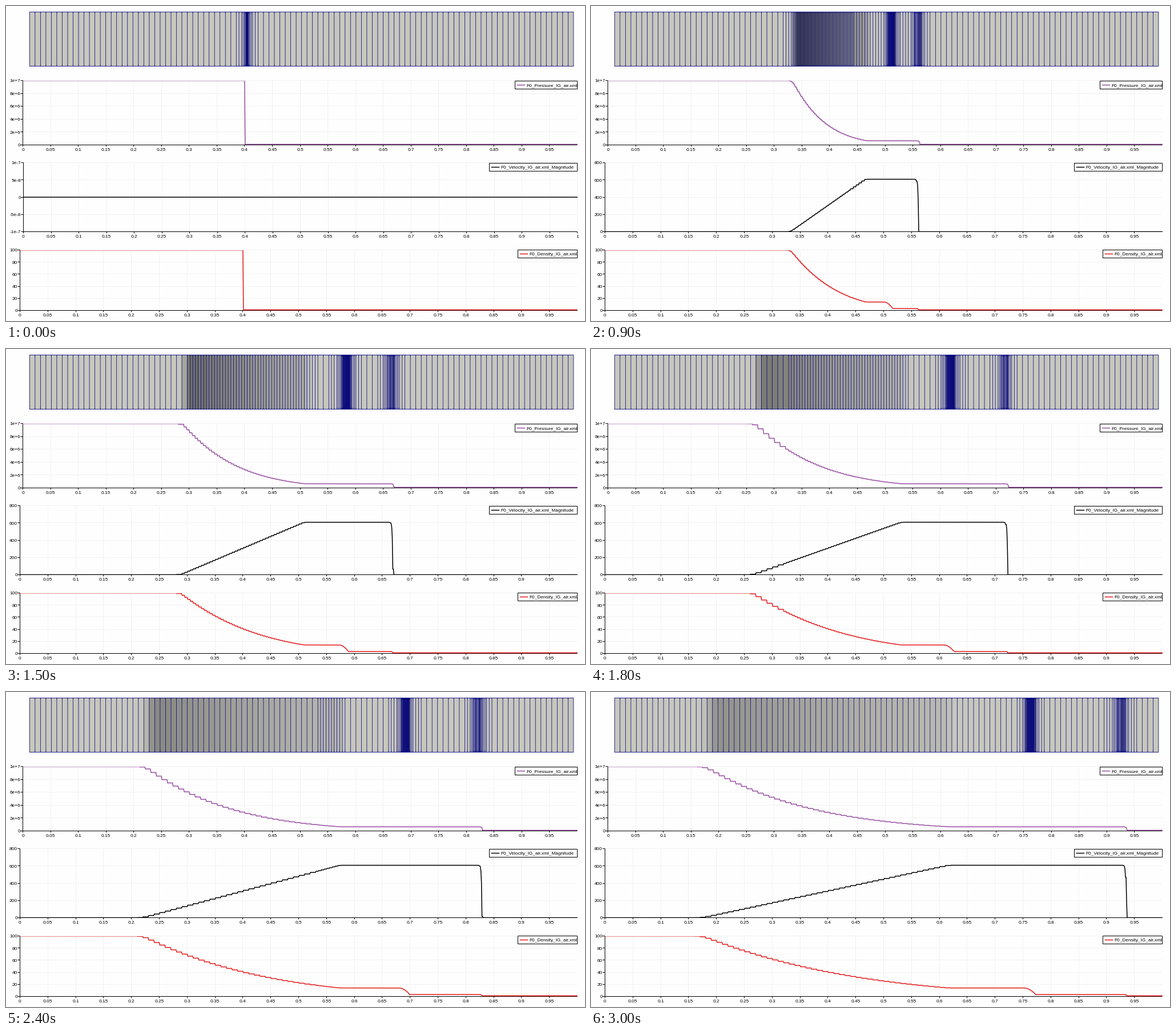
A matplotlib script for the animation above (3300 ms loop, 1014x552 px).

```python
import numpy as np
import matplotlib.pyplot as plt
from matplotlib.animation import FuncAnimation
from matplotlib.collections import LineCollection, PolyCollection
from matplotlib.patches import Rectangle
from matplotlib.transforms import Bbox, TransformedBbox

W, H, DPI = 1014, 552, 64
PX = 72 / DPI                      # points per pixel
FRAMES, STEP_MS = 11, 300
PAPER, GRID, NAVY = "#fdfefd", "#f1f2f1", "#000080"
FACE = np.array([0.78, 0.78, 0.742])
RIGHT = 1000.5

plt.rcParams["font.family"] = "Liberation Sans"
fig = plt.figure(figsize=(W / DPI, H / DPI), dpi=DPI, facecolor=PAPER)
ax = fig.add_axes([0, 0, 1, 1])
ax.set_xlim(0, W)
ax.set_ylim(H, 0)
ax.axis("off")

# ---- shock tube solution ------------------------------------------------
X0 = 0.4
P_L, P_R = 1e7, 1e5
RHO_MID_L, RHO_MID_R = 14.0, 3.17
U_MID = 608.0
SOUND = 374.17
DT = 6e-5                          # simulated seconds per step


def contact_at(k):
    return X0 + U_MID * DT * k


def front_at(k):
    return X0 + 0.003 + 0.0533 * k


def softplus(y, w):
    return w * np.logaddexp(0, y / w)


def state(x, k):
    """Pressure, velocity and density at positions x after k steps."""
    x = np.asarray(x, float)
    if k == 0:
        left = x < X0
        return (np.where(left, P_L, P_R), np.zeros_like(x),
                np.where(left, 100.0, 1.0))
    t = k * DT
    head = X0 - SOUND * t
    tail = X0 + 0.003 + (U_MID - 0.675 * SOUND) * t

    w = 0.001 + 0.0004 * k
    fan = (softplus(x - head, w) - softplus(x - tail, w / 2)) / (tail - head)
    u = U_MID * np.clip(fan, 0, 1)
    c = 1 - 0.2 * u / SOUND
    p, rho = P_L * c ** 7, 100 * c ** 5

    a = contact_at(k) - 0.007 - 0.0006 * k
    b = contact_at(k) + 0.006 + 0.0002 * k
    q = np.clip((x - a) / (b - a), 0, 1) ** 1.9
    rho = rho - (RHO_MID_L - RHO_MID_R) * q

    f = 1 - np.exp(np.minimum((x - front_at(k)) / 0.0011, 0))
    p = P_R + (p - P_R) * f
    rho = 1 + (rho - 1) * f
    return p, u * f, rho


# ---- adaptive mesh ------------------------------------------------------
# Refined parts of the expansion fan per step: (from, to, level)
FAN = {
    1: [(0.378, 0.42, 3)],
    2: [(0.357, 0.385, 3), (0.39, 0.425, 2)],
    3: [(0.335, 0.43, 2), (0.43, 0.46, 1)],
    4: [(0.315, 0.316, 2), (0.32, 0.475, 1), (0.482, 0.484, 2)],
    5: [(0.31, 0.505, 1)],
    6: [(0.34, 0.52, 1)],
    7: [(0.44, 0.54, 1)],
    8: [(0.55, 0.56, 1)],
}


def zones(k):
    if k == 0:
        return [(X0, X0, 4)]
    contact, front = contact_at(k), front_at(k)
    return FAN.get(k, []) + [(contact - 0.004, contact + 0.003, 4),
                             (front - 0.007, front - 0.003, 3)]


def split(lo, h, level, marks, out):
    for a, b, top in marks:
        gap = max(a - lo - h, lo - b, 0)
        if level < top and gap < 1.99 * h:
            split(lo, h / 2, level + 1, marks, out)
            split(lo + h / 2, h / 2, level + 1, marks, out)
            return
    out.append(lo)


def mesh(k):
    marks, out = zones(k), []
    for i in range(100):
        split(i / 100, 0.01, 0, marks, out)
    return np.array(out + [1.0])


MX0, MX1, MY0, MY1 = 41.3, 993.9, 10.5, 105.5
faces = PolyCollection([], edgecolors="none", antialiaseds=False, zorder=1)
edges = LineCollection([], colors=NAVY, linewidths=0.75 * PX, zorder=2)
tips = LineCollection([], colors=NAVY, linewidths=1.4 * PX, alpha=0.3,
                      zorder=2)
for part in (faces, edges, tips):
    part.set_snap(False)
    ax.add_collection(part, autolim=False)
ax.add_patch(Rectangle((MX0, MY0), MX1 - MX0, MY1 - MY0, fill=False,
                       ec=NAVY, lw=0.8 * PX, zorder=3, snap=False))


def draw_mesh(cells, mid, k):
    xs = MX0 + (MX1 - MX0) * cells
    faces.set_verts([[(l, MY0), (r, MY0), (r, MY1), (l, MY1)]
                     for l, r in zip(xs[:-1], xs[1:])])
    e = 0.001
    slope = np.abs(state(mid + e, k)[2] - state(mid - e, k)[2]) / (2 * e)
    shade = np.exp(-8.8e-4 * slope)
    faces.set_facecolor(shade[:, None] * FACE)
    inner = xs[1:-1]
    edges.set_segments([[(x, MY0), (x, MY1)] for x in inner])
    tips.set_segments([[(x, y), (x, y + 3)] for x in inner
                       for y in (MY0, MY1 - 3)])


# ---- charts -------------------------------------------------------------
def label(x, y, text, ha):
    return ax.text(x, y, text, ha=ha, va="baseline", fontsize=8.25 * PX,
                   color="black", zorder=8)


def strokes(segments, color, z):
    """One-pixel lines laid on pixel centres."""
    crisp = np.floor(np.array(segments)) + 0.5
    part = LineCollection(crisp, colors=color, linewidths=PX, zorder=z)
    part.set_snap(False)
    ax.add_collection(part, autolim=False)
    return part


def axes_set(left, top, bottom, names, last=False):
    """Grid, axis lines, ticks and labels; returns all the artists."""
    xt = np.arange(21 if last else 20) / 20
    xp = left + (RIGHT - left) * xt
    yp = np.linspace(top, bottom, len(names))
    grid = [[(x, top), (x, bottom)] for x in xp]
    grid += [[(left, y), (RIGHT, y)] for y in yp]
    dark = [[(left, top), (left, bottom)], [(left, bottom), (RIGHT, bottom)]]
    dark += [[(x, bottom), (x, bottom + 3)] for x in xp]
    dark += [[(left - 4, y), (left, y)] for y in yp]
    parts = [strokes(grid, GRID, 1), strokes(dark, "black", 4)]
    parts += [label(x, bottom + 10.6, f"{t:g}", "center")
              for x, t in zip(xp, xt)]
    parts += [label(left - 4.5, y + 2.8, n, "right")
              for y, n in zip(yp, names)]
    return parts


def legend(x, y, text, color):
    ax.add_patch(Rectangle((x, y), RIGHT - x, 14, fc="white", ec="black",
                           lw=PX, zorder=6, snap=False))
    ax.plot([x + 4, x + 17], [y + 7] * 2, color=color, lw=1.5 * PX,
            zorder=7, snap=False)
    label(x + 19.7, y + 9.7, text, "left")


def curve(left, top, bottom, color):
    line, = ax.plot([], [], color=color, lw=1.5 * PX, zorder=5,
                    solid_joinstyle="round", snap=False)
    box = Bbox([[left - 0.5, bottom + 0.5], [RIGHT + 0.5, top + 0.5]])
    line.set_clip_box(TransformedBbox(box, ax.transData))
    return line


P_LEFT, REST_LEFT, LEFT = 29.5, 30.5, 24.5
P_TOP, P_BOT = 130.5, 243.5
V_TOP, V_BOT = 274.5, 395.5
D_TOP, D_BOT = 427.5, 533.5

axes_set(P_LEFT, P_TOP, P_BOT,
         ["1e+7", "8e+6", "6e+6", "4e+6", "2e+6", "0"])
axes_set(LEFT, D_TOP, D_BOT, ["100", "80", "60", "40", "20", "0"])
rest_axes = axes_set(REST_LEFT, V_TOP, V_BOT,
                     ["1e-7", "5e-8", "0", "-5e-8", "-1e-7"], last=True)
flow_axes = axes_set(LEFT, V_TOP, V_BOT, ["800", "600", "400", "200", "0"])

PURPLE, RED = "#984ea3", "#e41a1c"
legend(891.5, 131.5, "F0_Pressure_IG_air.xml", PURPLE)
legend(846.5, 275.5, "F0_Velocity_IG_air.xml_Magnitude", "black")
legend(896.5, 427.5, "F0_Density_IG_air.xml", RED)

p_line = curve(P_LEFT, P_TOP, P_BOT, PURPLE)
v_line = curve(LEFT, V_TOP, V_BOT, "black")
d_line = curve(LEFT, D_TOP, D_BOT, RED)

SAMPLES = np.linspace(0, 1, 1001)


def plot(line, left, top, bottom, share):
    line.set_data(left + (RIGHT - left) * SAMPLES,
                  bottom - (bottom - top) * share)


def draw(k):
    cells = mesh(k)
    mid = (cells[:-1] + cells[1:]) / 2
    draw_mesh(cells, mid, k)

    # each sample takes the value of the cell it falls in
    idx = np.searchsorted(cells, SAMPLES - 1e-9) - 1
    idx = np.clip(idx, 0, len(mid) - 1)
    p, u, rho = (v[idx] for v in state(mid, k))

    rest = k == 0
    for part in rest_axes:
        part.set_visible(rest)
    for part in flow_axes:
        part.set_visible(not rest)
    plot(p_line, P_LEFT, P_TOP + 0.2, P_BOT, p / 1e7)
    plot(v_line, REST_LEFT if rest else LEFT, V_TOP, V_BOT,
         u + 0.5 if rest else u / 800)
    plot(d_line, LEFT, D_TOP + 0.2, D_BOT, rho / 100)
    return []


anim = FuncAnimation(fig, draw, frames=FRAMES, interval=STEP_MS,
                     init_func=lambda: draw(0), repeat=True, repeat_delay=0)
plt.show()
```
